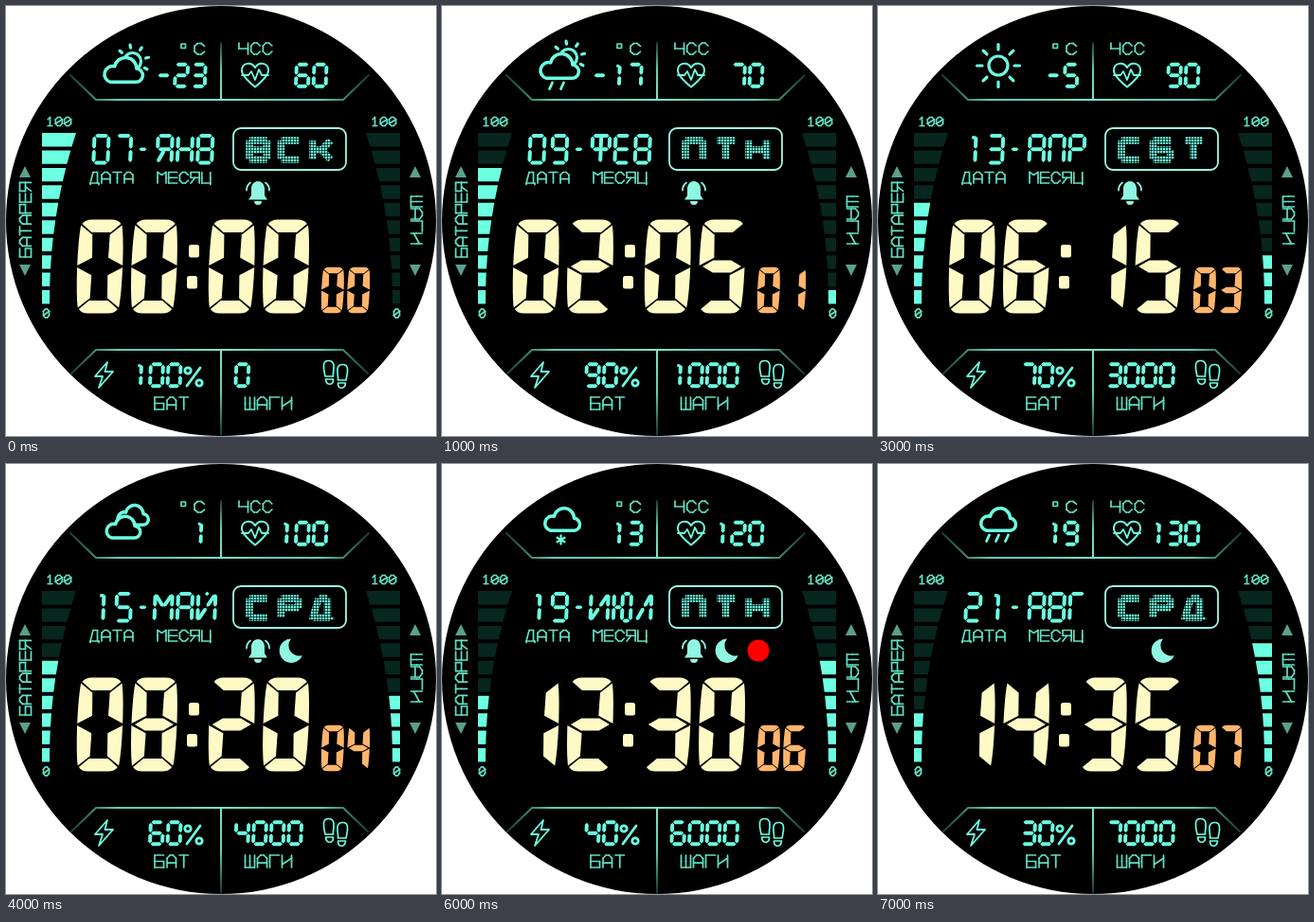
Animation of 454x454 px, one loop 8 s. Source, as an HTML page with a canvas:

```html
<!DOCTYPE html>
<html lang="ru">
<head>
<meta charset="utf-8">
<title>Watch face</title>
<style>
html, body { margin: 0; width: 100%; height: 100%; overflow: hidden; background: #fff; }
canvas { display: block; width: 454px; height: 454px; }
</style>
</head>
<body>
<canvas id="face" width="454" height="454"></canvas>
<script>
const ctx = document.getElementById('face').getContext('2d');
const MINT = '#6dffe1', PALE = '#8ff6e1', LABEL = '#62dfc2', CREAM = '#fffac5', ORANGE = '#ffb56c', DIM = '#07261d';

// Strokes on a 6 x 8 cell, as hex digits x1 y1 x2 y2 (y runs from 1 to 9).
const STROKES = {
  a: '0161', b: '6165', c: '6569', d: '0969', e: '0509', f: '0105', g: '0565',
  h: '0535', i: '3135', j: '3539', k: '0135', l: '6135', m: '3509', n: '3569',
  o: '090a', p: '696a', q: '2151', r: '5159', s: '2109', t: '2141',
  u: '2241', v: '4145', w: '4549', y: '3161', z: '3969',
  A: '0309', B: '6369', C: '0307', D: '0729', E: '2949', F: '4967', G: '0321',
  H: '4163', I: '0763', J: '0133', K: '6133', L: '1331', M: '1959', N: '6367', O: '0666'
};
const GLYPHS = {
  0: 'abcdef', 1: 'uvw', 2: 'abged', 3: 'abgcd', 4: 'fgbc', 5: 'afgcd', 6: 'afgcde',
  7: 'abc', 8: 'abcdefg', 9: 'abcdfg', '-': 'g',
  А: 'abcefg', Б: 'afgcde', В: 'abcdefg', Г: 'afe', Д: 'qrsdop', Е: 'afged', И: 'febclm',
  Й: 'febclmt', К: 'fehln', Л: 'lmbc', М: 'febckl', Н: 'febcg', П: 'afebc', Р: 'afebg',
  С: 'afed', Т: 'aij', Ф: 'afbgij', Ц: 'febcdp', Ч: 'fgbc', Ш: 'fedcbij', Ю: 'fehijybcz', Я: 'abfgcm'
};
// Labels use bevelled forms of some glyphs.
const LABEL_GLYPHS = {
  ...GLYPHS, 0: 'GtHNFEDCI', 1: 'LijM', А: 'ABGtHO', И: 'febcI', М: 'febcJK', С: 'HtGCDEF'
};

// Fat seven-segment shapes in a 47 x 98 cell; the others are mirrored.
const TOP = new Path2D('M3 4Q6 -.5 13 -.5H34Q41 -.5 44 4L33.5 13H13.500Z');
const SIDE = new Path2D('M1.8 5.500Q-.3 18 -.5 48L15 39.800 14.300 15.500Z');
const MIDDLE = new Path2D('M3 49L14 42.500H33L44 49 33 55.500H14Z');
const FAT = {
  a: [TOP, 1, 1], d: [TOP, 1, -1], g: [MIDDLE, 1, 1],
  f: [SIDE, 1, 1], b: [SIDE, -1, 1], e: [SIDE, 1, -1], c: [SIDE, -1, -1]
};

const CLOUD = new Path2D('M8 25.3H32a6.5 6.5 0 0 0 1-13a10.6 10.6 0 0 0-21-2a7.5 7.5 0 0 0-4 15Z');
const HEART = new Path2D('M263 85.5C255 79 249 73 249 68C249 60 259 58 263 65C267 58 277 60 277 68C277 73 271 79 263 85.5Z');
const PULSE = new Path2D('M249 73H256L259 69 263 78 267 67 270 73H277');
const BOLT = new Path2D('M107 376L94 391H102L98 403L113 386H104.5Z');
const FOOT = new Path2D('M337 391C336 386 335 383 335.5 379C336 373 345 373 346 379C346.5 384 345 387 345.5 391ZM337.5 394H345.5C346 401 338 401 337.5 394Z');
const BELL = new Path2D('M266 185c4.500 0 7 4 7 8v7l3 4.500h-20l3-4.500v-7c0-4 2.500-8 7-8ZM262 206h8a4 4 0 0 1-8 0Z');
const RINGING = new Path2D('M258 186.500q-4 3-4 8M274 186.500q4 3 4 8');
const MOON = new Path2D('M301 184.500A12.700 12.700 0 1 0 313 202A11 11 0 0 1 301 184.500Z');

const MONTHS = ['ЯНВ', 'ФЕВ', 'МАР', 'АПР', 'МАЙ', 'ИЮН', 'ИЮЛ', 'АВГ'];
const DAYS = ['ВСК', 'ПТН', 'ПНД', 'СБТ', 'СРД', 'ПНД', 'ПТН', 'СРД'];
const BATTERY_BARS = [10, 8, 8, 6, 6, 5, 4, 3];

const pad = n => String(n).padStart(2, '0');

function place(x, y, draw, skew = 0, scale = 1, angle = 0) {
  ctx.save();
  ctx.translate(x, y);
  ctx.rotate(angle);
  ctx.transform(scale, 0, -skew * scale, scale, 0, 0);
  draw();
  ctx.restore();
}

function line(...p) {
  ctx.beginPath();
  for (let i = 0; i < p.length; i += 2) ctx.lineTo(p[i], p[i + 1]);
  ctx.stroke();
}

function outline(path, width, color = MINT) {
  ctx.lineWidth = width;
  ctx.strokeStyle = color;
  ctx.stroke(path);
}

function segment(x1, y1, x2, y2, t) {
  const len = Math.hypot(x2 - x1, y2 - y1), ux = (x2 - x1) / len, uy = (y2 - y1) / len, half = t / 2;
  const point = (along, side) =>
    ctx.lineTo(x1 + ux * along - uy * side, y1 + uy * along + ux * side);
  ctx.beginPath();
  point(0.6, 0);
  point(half + 0.6, half);
  point(len - half - 0.6, half);
  point(len - 0.6, 0);
  point(len - half - 0.6, -half);
  point(half + 0.6, -half);
  ctx.fill();
}

function glyph(strokes, x, w, h, draw) {
  for (const name of strokes) {
    const [x1, y1, x2, y2] = [...STROKES[name]].map(c => parseInt(c, 16));
    draw(x + x1 * w / 6, (y1 - 1) * h / 8, x + x2 * w / 6, (y2 - 1) * h / 8);
  }
}

function label(text, x, y, w, h, pitch, angle = 0) {
  ctx.strokeStyle = LABEL;
  ctx.lineWidth = 1.7;
  place(x, y, () => [...text].forEach((ch, i) =>
    glyph(LABEL_GLYPHS[ch], i * pitch, w, h, line)), 0, 1, angle);
}

function digits(text, x, y, w, h, pitch, t) {
  ctx.fillStyle = MINT;
  place(x, y, () => [...text].forEach((ch, i) =>
    glyph(GLYPHS[ch], i * pitch, w, h, (...p) => segment(...p, t))), 0.04);
}

const numberLeft = (n, x, y) => digits(String(n), x, y, 13, 23, 18.6, 3.9);
const numberRight = (n, x, y) => numberLeft(n, x - 13 - 18.6 * (String(n).length - 1), y);

function monthName(text) {
  const widths = [...text].map(ch => 'МИЙФЮ'.includes(ch) ? 18 : 15);
  let x = 189.5 - (widths[0] + widths[1] + widths[2] + 12.6) / 2;
  [...text].forEach((ch, i) => {
    digits(ch, x, 137, widths[i], 28.5, 0, 4);
    x += widths[i] + 6.3;
  });
}

function fatDigit(ch, x, y, scale, color) {
  ctx.fillStyle = color;
  place(x, y, () => {
    for (const name of ch === '1' ? 'bc' : GLYPHS[ch]) {
      const [path, sx, sy] = FAT[name];
      ctx.save();
      ctx.translate(sx < 0 ? 47 : 0, sy < 0 ? 98 : 0);
      ctx.scale(sx, sy);
      ctx.fill(path);
      ctx.restore();
    }
  }, 0.04, scale);
}

function weekday(text) {
  ctx.strokeStyle = '#a2f8e4';
  ctx.lineWidth = 1.8;
  ctx.beginPath();
  ctx.roundRect(240, 129, 119, 44, 8);
  ctx.stroke();
  ctx.strokeStyle = MINT;
  ctx.lineWidth = 7.5;
  ctx.lineCap = 'butt';
  place(257, 142, () => [...text].forEach((ch, i) => glyph(GLYPHS[ch], i * 33.5, 18.5, 20, line)));
  ctx.lineCap = 'round';
  ctx.fillStyle = 'rgba(0, 0, 0, 0.65)';
  for (let x = 252; x < 353; x += 3) ctx.fillRect(x, 136, 1, 33);
  for (let y = 137; y < 170; y += 3) ctx.fillRect(250, y, 103, 1);
}

function gauge(lit) {
  const edge = y => 46 + 28 * Math.max(0, (314 - y) / 180) ** 2.1;
  for (let i = 0; i < 10; i++) {
    const top = 134 + 18.45 * i, bottom = top + 14.4;
    ctx.fillStyle = i >= 10 - lit ? MINT : DIM;
    ctx.beginPath();
    ctx.moveTo(38, top);
    ctx.lineTo(edge(top), top);
    ctx.lineTo(edge(bottom), bottom);
    ctx.lineTo(38, bottom);
    ctx.fill();
  }
}

function arrow(x, y, dir) {
  ctx.fillStyle = '#5aa08c';
  ctx.beginPath();
  ctx.moveTo(x, y - 6 * dir);
  ctx.lineTo(x + 6, y + 6 * dir);
  ctx.lineTo(x - 6, y + 6 * dir);
  ctx.fill();
}

function fade(x1, y1, x2, y2, ...stops) {
  const gradient = ctx.createLinearGradient(x1, y1, x2, y2);
  stops.forEach((color, i) => gradient.addColorStop(i / (stops.length - 1), color));
  ctx.strokeStyle = gradient;
}

function frameLines() {
  const bright = '#7ce6cb', mid = '#63cdb3', dark = '#12332b';
  ctx.lineWidth = 2;
  fade(64, 0, 386, 0, dark, mid, mid, bright, mid, mid, dark);
  line(68, 73, 95, 99, 356, 99, 383, 73);
  line(69, 388, 95, 363, 356, 363, 382, 388);
  fade(0, 36, 0, 98, dark, mid, bright);
  line(227, 39, 227, 98);
  fade(0, 363, 0, 454, bright, mid, dark);
  line(227, 363, 227, 453);
}

function cloud(x, y, scale = 1) {
  place(x, y, () => {
    ctx.fillStyle = '#000';
    ctx.fill(CLOUD);
    outline(CLOUD, 3.5 / scale);
  }, 0, scale);
}

function sun(x, y, r, rays, inner, outer) {
  ctx.strokeStyle = MINT;
  ctx.lineWidth = 3.2;
  ctx.beginPath();
  ctx.arc(x, y, r, 0, 7);
  ctx.stroke();
  for (const deg of rays) {
    const c = Math.cos(deg * Math.PI / 180), s = Math.sin(deg * Math.PI / 180);
    line(x + c * inner, y + s * inner, x + c * outer, y + s * outer);
  }
}

function sunnyCloud(dy) {
  sun(133.5, 54.5 + dy, 9, [-140, -98, -56, -14, 28], 14.5, 17.5);
  cloud(101.5, 48.5 + dy, 1.1);
}

function drops(y, ...xs) {
  ctx.strokeStyle = MINT;
  ctx.lineWidth = 2.8;
  for (const x of xs) line(x + 1.5, y, x - 1.5, y + 6.5);
}

function flakes(y, ...xs) {
  ctx.strokeStyle = MINT;
  ctx.lineWidth = 2.2;
  for (const x of xs) {
    for (const angle of [90, 30, 150]) {
      const c = 4.6 * Math.cos(angle * Math.PI / 180), s = 4.6 * Math.sin(angle * Math.PI / 180);
      line(x - c, y - s, x + c, y + s);
    }
  }
}

const WEATHER = [
  () => sunnyCloud(4),
  () => { sunnyCloud(0); drops(81, 115, 127); },
  () => { sunnyCloud(0); flakes(86, 117, 132); },
  () => sun(127, 63, 10, [0, 45, 90, 135, 180, 225, 270, 315], 17, 22.5),
  () => { cloud(116, 42, 0.88); cloud(104, 53.5, 0.97); },
  () => { cloud(106.5, 45); drops(75, 121, 132); },
  () => { cloud(106.5, 45); flakes(80, 125.5); },
  () => { cloud(106.5, 45); drops(75, 116, 126, 136); }
];

function percentSign() {
  ctx.strokeStyle = MINT;
  ctx.lineWidth = 2.8;
  line(205, 382, 191, 401);
  for (const [x, y] of [[192, 385], [204, 398]]) {
    ctx.beginPath();
    ctx.arc(x, y, 3.2, 0, 7);
    ctx.stroke();
  }
}

function statics() {
  frameLines();
  label('ЧСС', 246, 39, 9.5, 12, 12.7);
  label('С', 199, 39.5, 10.5, 11.5, 0);
  ctx.strokeRect(185, 40, 4.5, 4.5);
  label('ДАТА', 89, 175.5, 9, 11.5, 12);
  label('МЕСЯЦ', 160, 175.5, 9, 11.5, 11.7);
  label('БАТ', 157, 413, 9.5, 13, 13);
  label('ШАГИ', 252.5, 413, 10, 13, 13);
  label('БАТАРЕЯ', 14.5, 265, 9, 12, 11.6, -Math.PI / 2);
  label('ШАГИ', 439.5, 201, 11, 12, 13, Math.PI / 2);
  for (const x of [43, 386]) label('100', x, 117.5, 7, 9, 9.3);
  for (const x of [39.5, 409.5]) label('0', x, 320, 6, 9, 0);
  for (const x of [20, 432]) {
    arrow(x, 175, 1);
    arrow(x, 279, -1);
  }
  outline(HEART, 2);
  outline(PULSE, 1.8);
  outline(BOLT, 1.8);
  outline(FOOT, 1.7);
  // The right shoe print mirrors the left one, slightly lower.
  ctx.save();
  ctx.transform(-1, 0, 0, 1, 696, 4);
  outline(FOOT, 1.7);
  ctx.restore();
  percentSign();
  ctx.fillStyle = CREAM;
  for (const [x, y] of [[193, 252], [191, 285]]) {
    ctx.beginPath();
    ctx.roundRect(x, y, 11, 13.5, 2.5);
    ctx.fill();
  }
}

function statusIcons(step) {
  ctx.fillStyle = PALE;
  if (step < 7) {
    ctx.fill(BELL);
    outline(RINGING, 1.8, PALE);
  }
  if (step > 3) ctx.fill(MOON);
  if (step === 6) {
    ctx.fillStyle = '#f00';
    ctx.beginPath();
    ctx.arc(334, 197, 11.5, 0, 7);
    ctx.fill();
  }
}

function render(now) {
  const step = Math.floor(now / 1000) % 8;
  ctx.clearRect(0, 0, 454, 454);
  ctx.lineCap = ctx.lineJoin = 'round';
  ctx.fillStyle = '#000';
  ctx.beginPath();
  ctx.arc(227, 227, 227, 0, 7);
  ctx.fill();

  statics();
  WEATHER[step]();
  numberRight(6 * step - 23, 210.7, 61.8);
  numberRight(60 + 10 * step, 338.5, 61.8);
  numberRight(100 - 10 * step, 184.5, 378.2);
  numberLeft(1000 * step, 243.3, 378.2);

  digits(pad(7 + 2 * step), 93.5, 137, 15, 28.5, 23.7, 4);
  digits('-', 140.5, 137, 9, 28.5, 0, 3.4);
  monthName(MONTHS[step]);
  weekday(DAYS[step]);
  statusIcons(step);

  gauge(BATTERY_BARS[step]);
  ctx.save();
  ctx.transform(-1, 0, 0, 1, 454, 0);
  gauge(step);
  ctx.restore();

  const clock = pad(2 * step) + pad(5 * step);
  [77.6, 134.9, 216.7, 274].forEach((x, i) => fatDigit(clock[i], x, 226, 1, CREAM));
  [334.3, 361.6].forEach((x, i) => fatDigit(pad(step)[i], x, 276, 0.49, ORANGE));
  requestAnimationFrame(render);
}
requestAnimationFrame(render);
</script>
</body>
</html>
```
